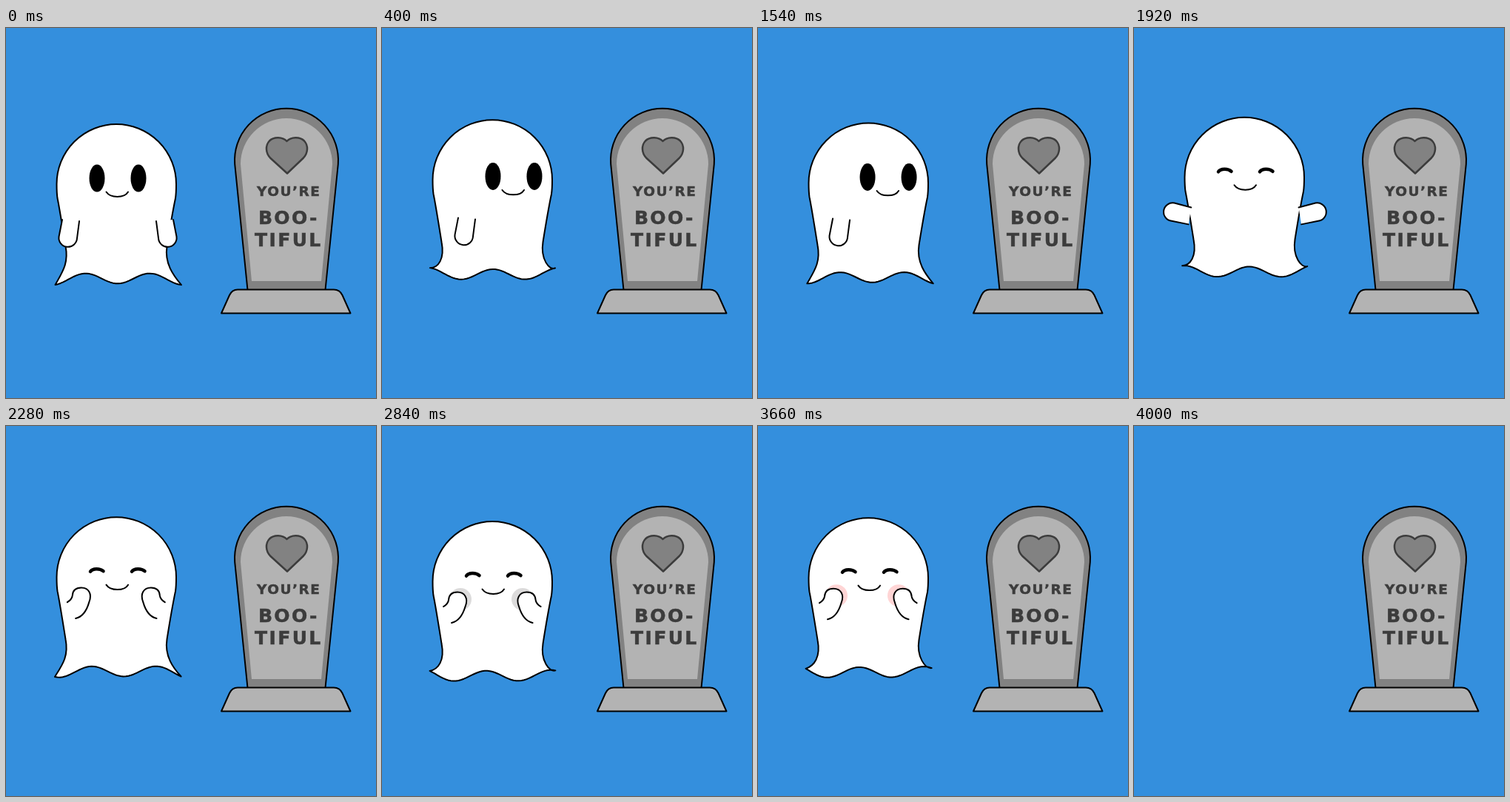
An HTML page for the animation above (4020 ms loop, 500 by 500 pixels).

```html
<!DOCTYPE html>
<html lang="en">
<head>
<meta charset="utf-8">
<title>Boo-tiful</title>
<style>
  html, body { margin: 0; width: 100%; height: 100%; overflow: hidden; background: #348fdd; }
  svg { display: block; width: 100%; height: 100%; }
  .line { stroke: #000; stroke-width: 2; stroke-linecap: round; stroke-linejoin: round; }
  .open { fill: none; }
  .lids { fill: none; stroke: #000; stroke-width: 4.5; stroke-linecap: round; }
  text { font-family: "DejaVu Sans", sans-serif; font-weight: 700; fill: #3c3c3c; stroke: #3c3c3c; stroke-width: .5; }
</style>
</head>
<body>
<svg viewBox="0 0 500 500">
  <defs>
    <path id="hangingArm" class="line" fill="#fff" d="M76 129L71.500 152A12.300 12.300 0 1 0 96 154L99 131"/>
    <path id="raisedHand" class="line" fill="#fff"
      d="M94 137C103 135 109 127 112.500 115C117 104 112 95.500 102 95.500C95 95.500 90.500 99 90 106C89.500 110 88 112 83 115"/>
  </defs>
  <rect width="500" height="500" fill="#348fdd"/>
  <g id="ghost">
    <g id="behind"></g>
    <path id="body" class="line" fill="#fff"/>
    <g id="face">
      <g id="cheeks"><circle cx="106" cy="105" r="15"/><circle cx="190" cy="105" r="15"/></g>
      <g id="openEyes"><ellipse cx="123" cy="73" rx="10.500"/><ellipse cx="179" cy="73" rx="10.500"/></g>
      <g id="closedEyes" class="lids">
        <path d="M114 73.500C117 69 127 69 131.500 73"/>
        <path d="M170 73.500C173 69 183 69 187.500 73"/>
      </g>
      <path class="line open" d="M135.500 91.500C141 100 160 100 165 91.500"/>
    </g>
    <g id="front">
      <g id="leftArm"><use/></g>
      <g id="rightArm"><use/></g>
    </g>
  </g>
  <g id="tombstone">
    <path class="line" fill="#828282" d="M326.500 354L309.200 184A70 70 0 1 1 448.800 184L431.500 354Z"/>
    <path fill="#b3b3b3" d="M332 342L317 184A62 62 0 0 1 441 184L426 342Z"/>
    <path class="line" fill="#b3b3b3" d="M291 385.500L302 361Q305.500 353.500 313 353.500H443Q451 353.500 454.500 361L465.500 385.500Z"/>
    <path fill="#828282" stroke="#3c3c3c" stroke-width="2.500" stroke-linejoin="round" transform="translate(0 1)"
      d="M379.500 152C374 146 362 145.500 356 151.500C350 158 351 168 357 174.500L380 195.500L402 174.500C408 168 409 158 403 151.500C397 145.500 385 146 379.500 152Z"/>
    <text x="339" y="227" font-size="18.500" letter-spacing="1.500">YOU’RE</text>
    <text x="341" y="265" font-size="25" letter-spacing="2.300">BOO-</text>
    <text x="336" y="294.500" font-size="25" letter-spacing="2.400">TIFUL</text>
  </g>
</svg>
<script>
const LOOP = 4020, VISIBLE = 4000, TAU = Math.PI * 2;
const el = id => document.getElementById(id);
const show = (id, on) => { el(id).style.display = on ? "" : "none"; };
const place = (id, transform) => el(id).setAttribute("transform", transform);
const mix = (a, b, k) => a + (b - a) * k;

// Eased rise from 0 to 1 between two times.
function ramp(t, start, end) {
  const k = Math.min(1, Math.max(0, (t - start) / (end - start)));
  return k * k * (3 - 2 * k);
}

// Dome and sides are fixed; a travelling cosine forms the hem.
function bodyPath(t) {
  const crest = 108 - 0.1095 * t;
  const phase = x => (x - crest) / 86 * TAU;
  const hem = x => 208.5 - 6.8 * Math.cos(phase(x)) * (1 + 0.25 * ((x - 151) / 85) ** 4);
  const left = 65.7 + 1.2 * Math.cos(phase(66) - 4);
  const right = 235.5 - 1.4 * Math.cos(phase(236));
  let d = `M${left} ${hem(left)}C76 200 85 188 80.5 165C77 143 72 112 69.5 100Q68.5 93 68.5 81` +
    `A80.75 81 0 0 1 230 81Q230 93 229 100C226.5 112 221 143 217.5 165` +
    `C214 188 226 204 ${right} ${hem(right)}`;
  for (let i = 1; i < 48; i++) {
    const x = mix(right, left, i / 48);
    d += `L${x.toFixed(2)} ${hem(x).toFixed(2)}`;
  }
  return d + "Z";
}

// raise: 0 hanging, 1 stretched out, 2 at the cheek.
function drawArms(raise, turn, dip) {
  const up = raise > 1;
  const pose = up ? `rotate(${(raise - 2) * 80} 88 128)` : `rotate(${raise * 95} 80 126)`;
  for (const id of ["leftArm", "rightArm"]) {
    const use = el(id).firstElementChild;
    use.setAttribute("href", up ? "#raisedHand" : "#hangingArm");
    use.setAttribute("transform", pose);
  }
  place("leftArm", `translate(${turn} ${dip})`);
  place("rightArm", `translate(${302 - 2.2 * raise - turn * 0.65} ${dip}) scale(-1 1)`);
  const layer = el(turn > 3 ? "behind" : "front");
  if (el("rightArm").parentNode !== layer) layer.appendChild(el("rightArm"));
}

function draw(t) {
  show("ghost", t < VISIBLE);
  place("ghost", `translate(0 ${125.1 + 5 * Math.cos(TAU * (t - 30) / 1335)})`);
  el("body").setAttribute("d", bodyPath(t));

  const turn = 29.5 * (ramp(t, 40, 480) - ramp(t, 1470, 1760));
  const dip = 3.5 * (ramp(t, 40, 480) - ramp(t, 1100, 1540));
  place("face", `translate(${turn} ${dip})`);

  const squint = ramp(t, 480, 780) - ramp(t, 780, 1080);
  const eye = 18.5 - 2.5 * squint - 16.5 * ramp(t, 1700, 1880);
  show("openEyes", eye > 3);
  show("closedEyes", eye <= 3);
  for (const e of el("openEyes").children) e.setAttribute("ry", eye);

  const blush = ramp(t, 2800, 3240), fade = mix(219, 213, blush);
  el("cheeks").setAttribute("fill", `rgb(${mix(219, 255, blush)},${fade},${fade})`);
  el("cheeks").setAttribute("opacity", ramp(t, 2400, 2800));

  drawArms(ramp(t, 1640, 1940) + ramp(t, 1940, 2300) - 0.6 * ramp(t, 3800, 4000), turn, dip);
}

function tick() {
  draw(performance.now() % LOOP);
  requestAnimationFrame(tick);
}
draw(0);
requestAnimationFrame(tick);
</script>
</body>
</html>
```
